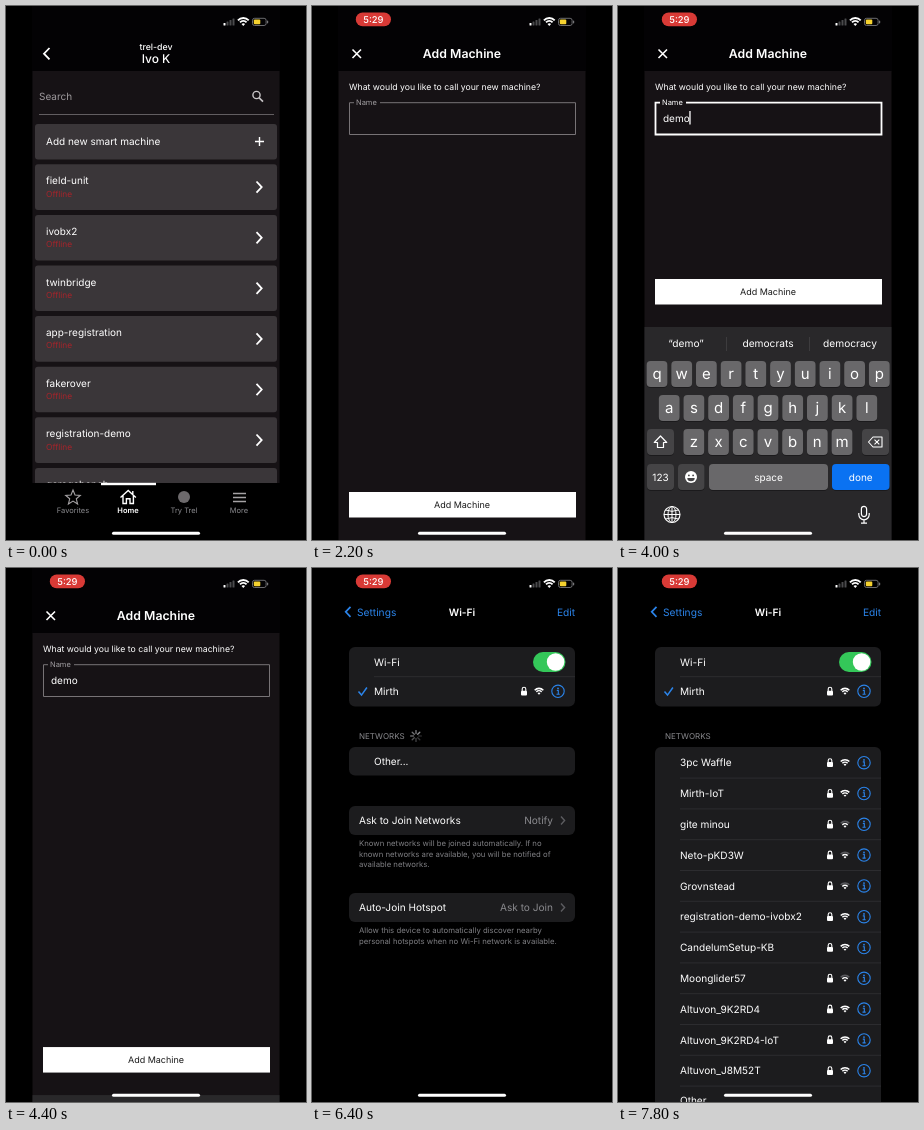
These frames come from a looping animation (300x534 px, 8000 ms). An HTML page:

```html
<!DOCTYPE html>
<html lang="en">
<head>
<meta charset="utf-8">
<title>Machine setup</title>
<style>
  html, body { margin: 0; width: 100%; height: 100%; overflow: hidden; background: #000; }
  svg { display: block; width: 100%; height: 100%; font-family: Inter, Roboto, sans-serif; text-rendering: geometricPrecision; }
</style>
</head>
<body>
<svg id="stage" viewBox="0 0 300 534"></svg>
<script>
const LOOP = 8000, STEP = 200;
const WHITE = '#fff', BODY = '#161215', HEADER = '#030204', CARD = '#3a3639', CELL = '#1c1c1e', BLUE = '#2b84ea', GRAY = '#8a8a8e';

// Drawing helpers
const text = (x, y, size, str, fill = WHITE, more = '') =>
  `<text x="${x}" y="${y}" font-size="${size}" fill="${fill}" ${more}>${str}</text>`;
const centered = (x, y, size, str, fill, weight = 400) =>
  text(x, y, size, str, fill, `text-anchor="middle" font-weight="${weight}"`);
const rect = (x, y, w, h, fill, r = 0) =>
  `<rect x="${x}" y="${y}" width="${w}" height="${h}" rx="${r}" fill="${fill}"/>`;
const line = (d, stroke = WHITE, width = 1, more = '') =>
  `<path d="${d}" fill="none" stroke="${stroke}" stroke-width="${width}" ${more}/>`;
const circle = (x, y, r, fill) => `<circle cx="${x}" cy="${y}" r="${r}" fill="${fill}"/>`;
const ring = (x, y, r, stroke, width = 1) =>
  `<circle cx="${x}" cy="${y}" r="${r}" fill="none" stroke="${stroke}" stroke-width="${width}"/>`;
const at = (x, y, content, scale = 1) => `<g transform="translate(${x} ${y}) scale(${scale})">${content}</g>`;
const group = (id, content) => `<g id="${id}">${content}</g>`;
const range = (n, f) => Array.from({ length: n }, (_, i) => f(i)).join('');

// Icons
const wifi = (x, y, scale, weak) => at(x, y,
  line('M-5.4-1.4A7.6 7.6 0 0 1 5.4-1.4', weak ? '#5a5a5e' : WHITE, 1.9) +
  line('M-3.3.7A4.7 4.7 0 0 1 3.3.7', WHITE, 1.9) +
  `<path d="M0 4.2L-1.8 2.3A2.6 2.6 0 0 1 1.8 2.3Z" fill="#fff"/>`, scale);
const lock = (x, y) => at(x, y, rect(-3, -.6, 6, 4.8, WHITE, 1) + line('M-1.8 0V-2.2A1.8 1.8 0 0 1 1.8-2.2V0', WHITE, 1.1));
const info = (x, y) => at(x, y, ring(0, 0, 6.2, BLUE, 1.1) + circle(0, -2.8, .9, BLUE) + line('M-1.2-.8H.3V3M-1.5 3H1.7', BLUE, 1.1));
const networkIcons = (y, weak) => lock(212, y) + wifi(227, y, .8, weak) + info(246, y);

const page = (title, content) =>
  rect(26, 0, 248, 66, HEADER) + rect(26.5, 65, 247, 469, BODY) +
  line('M40.5 43.5l8.5 8.5m0-8.5l-8.5 8.5', WHITE, 1.6) +
  centered(150, 52, 12.3, title, WHITE, 600) + content;

function homeScene() {
  const machines = ['field-unit', 'ivobx2', 'twinbridge', 'app-registration', 'fakerover', 'registration-demo', 'garagebench'];
  const cards = machines.map((name, i) => {
    const y = 158.3 + 50.6 * i;
    return rect(29, y, 242, 45.6, CARD, 3) + text(40, y + 20, 10, name) +
      text(40, y + 32.3, 8.4, 'Offline', '#a5242b') +
      line(`M250.5 ${y + 17.2}l5.2 5.6-5.2 5.6`, WHITE, 1.8);
  }).join('');
  const tab = (x, label, active) => centered(x, 507, 7.5, label, active ? WHITE : GRAY, active ? 600 : 400);
  return rect(26, 0, 248, 534, HEADER) + rect(26.5, 65, 247, 412, BODY) +
    line('M43.5 42l-5.5 5.7 5.5 5.7', WHITE, 1.8) +
    centered(150, 44, 8.8, 'trel-dev', WHITE, 500) + centered(150, 57, 12, 'Ivo K', WHITE, 500) +
    text(33, 94, 10, 'Search', '#9d999c') + ring(250.5, 89, 3.6, '#c9c6c8', 1.4) +
    line('M253 91.6l4 4', '#c9c6c8', 1.6) + line('M33 108.5H268', '#625e61') +
    rect(29, 118, 242, 35.5, CARD, 3) + text(40, 139, 10, 'Add new smart machine') +
    line('M253.5 131v9m-4.5-4.5h9', WHITE, 1.4) + cards +
    rect(26, 477, 248, 57, '#000') + rect(95, 476.8, 55, 2.4, WHITE) +
    line('M67 484l2 5 5.3.4-4 3.4 1.3 5.2-4.6-2.9-4.6 2.9 1.3-5.2-4-3.4 5.3-.4z', '#a5a2a4', 1.1) +
    line('M114.5 491.5l7.7-7 7.7 7M117 489.5v8h3.4v-4.7h3.6v4.7h3.4v-8M126.8 485v3', WHITE, 1.4) +
    circle(178, 491, 6, '#6d6a6c') +
    line('M227 487.5h13m-13 4h13m-13 4h13', '#a5a2a4', 1.3) +
    tab(67, 'Favorites') + tab(122, 'Home', true) + tab(178, 'Try Trel') + tab(233, 'More');
}

function keyboard() {
  const key = (x, y, w, fill, label = '', size = 10) =>
    rect(x, y + .8, w, 26, '#171618', 4) + rect(x, y, w, 26, fill, 4) +
    centered(x + w / 2, y + 13 + size * .35, size, label, WHITE);
  const LIGHT = '#69686a', DARK = '#454446';
  const row = (letters, x, y) => [...letters].map((c, i) => key(x + 24.7 * i - 10.4, y, 20.8, LIGHT, c, 15)).join('');
  return rect(26.5, 0, 247, 240, '#29282a') +
    line('M108.5 10v14M191.5 10v14', '#3d3c3e') +
    [68, 150, 232].map(x => centered(x, 20.3, 10.2, '', WHITE).replace('<text', '<text class="hint"')).join('') +
    row('qwertyuiop', 39, 34) + row('asdfghjkl', 51.2, 68) + row('zxcvbnm', 75.8, 102) +
    key(29, 102, 27, DARK) + line('M42.5 109l6.2 6.5h-3.2v5h-6v-5h-3.2z', WHITE, 1.2, 'stroke-linejoin="round"') +
    key(244, 102, 27, DARK) + line('M255 110h9v10h-9l-4.5-5zM256.5 112.6l4.8 4.8m0-4.8l-4.8 4.8', WHITE, 1.1, 'stroke-linejoin="round"') +
    key(29, 137, 27, DARK, '123') + key(60, 137, 26.5, DARK) +
    circle(73, 150, 6, WHITE) + circle(70.9, 148.4, .9, DARK) + circle(75.1, 148.4, .9, DARK) +
    `<path d="M69.3 151h7.4a3.7 3.3 0 0 1-7.4 0z" fill="${DARK}"/>` +
    key(91, 137, 119, LIGHT, 'space') + key(214, 137, 57.5, '#0a72f2', 'done') +
    at(54, 187.5, ring(0, 0, 8, WHITE, 1.1) + line('M-8 0H8M0-8V8M-6.4-4.5Q0-1.8 6.4-4.5M-6.4 4.5Q0 1.8 6.4 4.5') +
      '<ellipse rx="4" ry="8" fill="none" stroke="#fff"/>') +
    at(246, 187.5, line('M-2.6-5.5a2.6 2.6 0 0 1 5.2 0v5a2.6 2.6 0 0 1-5.2 0zM-5.2-1.5v1.6a5.2 5.2 0 0 0 10.4 0v-1.6M0 5.4v3.2M-3 8.7h6', WHITE, 1.2));
}

const addScene = () => page('Add Machine',
  text(37, 83.5, 8.7, 'What would you like to call your new machine?') +
  line('M42 96.7H37.5V128.5H263.5V96.7H68', '#777376', 1, 'id="outline"') +
  text(44, 99.3, 7.5, 'Name', '#a09da0', 'id="label"') + text(45, 115.5, 10, '', WHITE, 'id="field"') +
  '<rect id="caret" y="105" width="1.3" height="13.5" fill="#fff"/>' +
  group('submit', rect(37, 0, 227, 25.5, WHITE) + centered(150, 16, 9, 'Add Machine', '#1b1b1b')) +
  group('keyboard', keyboard()));

function setupScene() {
  const steps = [
    [135.5, '1. Turn on the smart machine you are'], [147.5, 'attempting to connect to.'],
    [169.7, '2. Leave the app and navigate to your mobile'], [181.7, "device's Wi-Fi settings page. Connect to the"],
    [193.7, 'Wi-Fi associated with the smart machine you'], [205.7, 'want to connect to.'],
    [228.3, '3. Return to this screen and tap "Next".']];
  return page('demo Setup',
    text(37, 87, 12.6, "Connect to your Smart Machine's", WHITE, 'font-weight="500"') +
    text(37, 103, 12.6, 'Wi-Fi', WHITE, 'font-weight="500"') +
    steps.map(([y, str]) => text(37, y, 10, str)).join('') +
    text(37, 461, 8.8, 'Are you on your devices Wi-Fi?') + line('M176.2 453h10.6v10.6h-10.6z', '#b5b2b4', 1.2) +
    rect(37, 476, 226.5, 25.5, '#2c282b') + centered(150, 492, 9, 'Next', '#6c686b'));
}

function wifiScene() {
  const cell = (y, h) => rect(37, y, 226, h, CELL, 6);
  const divider = y => line(`M62 ${y}H263`, '#343437', .7);
  const option = (y, name, value) => cell(y, 29) + text(47, y + 18, 10.1, name) +
    text(241, y + 18, 10.1, value, GRAY, 'text-anchor="end"') + line(`M249 ${y + 10.5}l3.6 4-3.6 4`, '#5c5c60', 1.4);
  const note = (y, lines) => lines.map((str, i) => text(47, y + 10.4 * i, 7.75, str, '#7f7f83')).join('');
  const networks = [['3pc Waffle'], ['Mirth-IoT'], ['gite minou', 1], ['Neto-pKD3W', 1], ['Grovnstead', 1],
    ['registration-demo-ivobx2'], ['CandelumSetup-KB'], ['Moonglider57', 1],
    ['Altuvon_9K2RD4'], ['Altuvon_9K2RD4-IoT'], ['Altuvon_J8M52T']];
  const rows = networks.map(([name, weak], i) => {
    const y = 194.7 + 30.8 * i;
    return text(62, y + 3.7, 10.1, name) + networkIcons(y, weak) + divider(y + 15.4);
  }).join('');
  const spokes = range(8, i => `<path d="M0-2.4V-5.4" stroke="#98989c" stroke-width="1.3" stroke-linecap="round" opacity="${.25 + i * .1}" transform="rotate(${i * 45})"/>`);
  return rect(0, 0, 300, 534, '#000') +
    line('M38.5 38.8l-4.8 5 4.8 5', BLUE, 1.7) + text(45, 47.5, 10.2, 'Settings', BLUE) +
    centered(150, 47.5, 10.2, 'Wi-Fi', WHITE, 600) + text(245, 47.5, 10.2, 'Edit', BLUE) +
    cell(79, 59.5) + divider(108.7) + text(62, 97.6, 10.2, 'Wi-Fi') +
    rect(221, 84, 32.5, 20, '#34c759', 10) + circle(243.6, 94, 8.8, WHITE) +
    line('M46.5 123.5l3 3.6 5.4-7.6', BLUE, 1.5) + text(62, 127, 10.1, 'Mirth') + networkIcons(123.3) +
    text(47, 171, 8, 'NETWORKS', GRAY) +
    group('searching',
      at(104, 168, group('spinner', spokes)) + cell(179, 28.5) + text(62, 197.2, 10, 'Other...') +
      option(238, 'Ask to Join Networks', 'Notify') +
      note(278.2, ['Known networks will be joined automatically. If no',
        'known networks are available, you will be notified of', 'available networks.']) +
      option(325, 'Auto-Join Hotspot', 'Ask to Join') +
      note(365.4, ['Allow this device to automatically discover nearby',
        'personal hotspots when no Wi-Fi network is available.'])) +
    group('networks', cell(179, 380) + rows + text(62, 536, 10, 'Other...'));
}

const statusBar = () =>
  range(4, i => rect(217.5 + 3 * i, 17 - 1.5 * i, 2, 2.5 + 1.5 * i, i ? '#4b4b4d' : WHITE, .5)) +
  wifi(237.3, 15.7, 1) +
  `<rect x="246.5" y="12.3" width="13.6" height="7.2" rx="2" fill="none" stroke="#77777a" stroke-width=".9"/>` +
  rect(247.8, 13.5, 6.5, 4.8, '#f6d22f', 1) + rect(261, 14.4, 1.2, 3, '#77777a', .6) +
  group('pill', rect(43.8, 6.6, 35.2, 13.6, '#d83a36', 6.8) +
    group('recording', ring(61.4, 13.4, 4, WHITE, 1.1) + circle(61.4, 13.4, 2.1, WHITE)) +
    group('clock', centered(61.4, 16.9, 9.4, '5:29', WHITE, 500)));

document.getElementById('stage').innerHTML =
  '<clipPath id="screen"><rect x="26" width="248" height="534"/></clipPath>' + rect(0, 0, 300, 534, '#000') +
  '<g clip-path="url(#screen)">' + group('home', homeScene()) + group('add', addScene()) +
  group('setup', setupScene()) + group('wifi', wifiScene()) + '</g>' + statusBar() + rect(106, 525.7, 88, 3, WHITE, 1.5);

// Animation
const el = id => document.getElementById(id);
const show = (id, on) => el(id).setAttribute('display', on ? 'inline' : 'none');
const move = (id, x, y) => el(id).setAttribute('transform', `translate(${x} ${y})`);
const easeOut = (t, start, end) => 1 - (1 - Math.min(1, Math.max(0, (t - start) / (end - start)))) ** 3;
const settle = (t, start) => t < start ? 0 : 1 - Math.exp((start - t) / 73);
const HINTS = [['I', 'The', 'I’m'], ['“d”', 'do', 'did'], ['“de”', 'dead', 'deal'],
  ['“dem”', 'demo', 'demand'], ['“demo”', 'democrats', 'democracy']];
const hints = document.querySelectorAll('.hint');

function render(t) {
  show('home', t < 1000);
  show('add', t >= 400 && t < 4800);
  show('setup', t >= 4400 && t < 6200);
  show('wifi', t >= 6200);
  move('add', 0, 534 * (1 - easeOut(t, 450, 800)));
  move('setup', 248 * (1 - easeOut(t, 4450, 4800)), 0);

  show('pill', t >= 800);
  show('recording', t < 1600);
  show('clock', t >= 1600);

  const keyboardTop = 534 - 213 * (settle(t, 2550) - settle(t, 4150));
  move('keyboard', 0, keyboardTop);
  move('submit', 0, keyboardTop - 48);
  const focused = t >= 2600 && t < 4200;
  el('outline').setAttribute('stroke', focused ? WHITE : '#777376');
  el('outline').setAttribute('stroke-width', focused ? 1.8 : 1);
  el('label').setAttribute('fill', focused ? WHITE : '#a09da0');
  show('caret', focused);

  const typed = Math.min(4, Math.max(0, Math.floor((t - 3000) / 200)));
  el('field').textContent = 'demo'.slice(0, typed);
  const width = typed && t < 4800 ? el('field').getComputedTextLength() : 0;
  el('caret').setAttribute('x', 44.6 + width);
  hints.forEach((hint, i) => hint.textContent = HINTS[typed][i]);

  show('searching', t < 7400);
  show('networks', t >= 7400);
  el('spinner').setAttribute('transform', `rotate(${(t - 6400) / 1000 * 360 + 90})`);
}

let shown = -1;
function tick() {
  const t = Math.floor(performance.now() % LOOP / STEP) * STEP;
  if (t !== shown) render(shown = t);
  requestAnimationFrame(tick);
}
tick();
</script>
</body>
</html>
```
